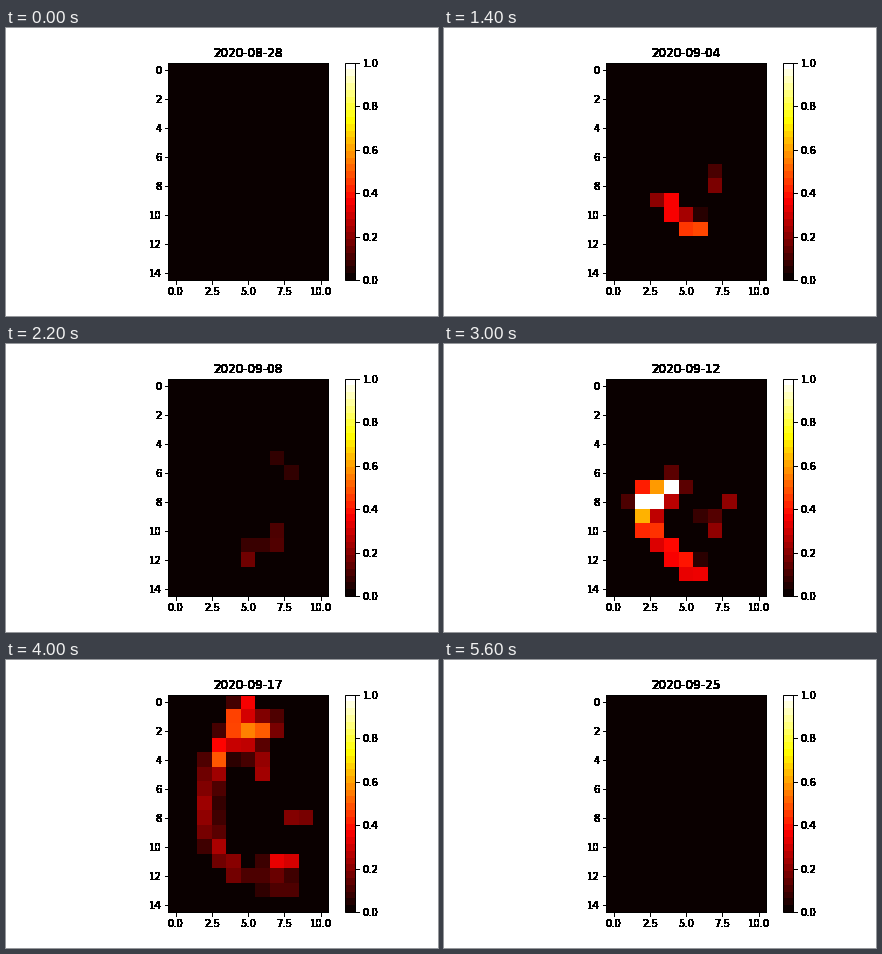
Recreate the animation shown at these times as a matplotlib script. Size 432x288 px, loop 6600 ms.

```python
import numpy as np
import matplotlib.pyplot as plt
from matplotlib.animation import FuncAnimation
from matplotlib.cm import ScalarMappable

ROWS, COLS = 15, 11
DAYS, HOLD = 29, 4          # the last day stays for four extra ticks
STEP = 200
WIDTH = 0.65                # reach of a fire front, in cells
LIFE = 3                    # days from first spark to full heat
DRIFT = np.array([-0.4, 0.4])   # rows and columns per day
FLOOR = 0.045               # weaker heat is not detected

plt.rcParams.update({
    "font.family": "DejaVu Sans", "font.size": 10, "axes.titlesize": 12,
    "figure.subplot.left": 0.125, "figure.subplot.right": 0.9,
    "figure.subplot.bottom": 0.125, "figure.subplot.top": 0.88,
    "axes.linewidth": 1, "xtick.major.width": 1, "ytick.major.width": 1,
})

# hottest day: fronts as (heat, (row, column), ...)
FIRES = {
    7: [(0.45, (9, 3.6), (10, 4.4)), (0.47, (11, 5.2), (11, 6)),
        (0.17, (7.5, 7), (8, 7))],
    11: [(0.06, (5, 7), (6, 8)), (0.06, (11, 5), (11, 6)),
         (0.1, (10, 7), (11, 7)), (0.15, (12, 5))],
    15: [(1.3, (7, 4), (7.7, 3), (7.7, 2)), (0.75, (9, 2.3), (10, 2.5)),
         (0.5, (11, 3.5), (13, 5.6)), (0.2, (8, 8)), (0.2, (9.3, 6.6), (10, 7))],
    18: [(1.7, (1.2, 4), (2.3, 3.2), (3, 4), (2.4, 5.6)),
         (1.5, (3.6, 2.7), (5, 2)), (0.75, (4, 4.6), (5.6, 5.2)),
         (0.75, (6, 1.7), (8, 1.4), (10.3, 1.7), (12, 2.9)),
         (0.6, (9, 7), (9, 8)), (1.1, (12, 6), (12, 7)),
         (0.38, (13, 3), (13.3, 6), (14, 7))],
    24: [(0.06, (6, 0))],
    26: [(0.06, (11, 4))],
}
CELLS = np.stack(np.mgrid[:ROWS, :COLS], axis=-1)


def distance(p, q):
    """Distance of every cell from the segment p-q."""
    d = q - p
    t = np.clip((CELLS - p) @ d / max(d @ d, 1e-9), 0, 1)
    return np.linalg.norm(CELLS - p - t[..., None] * d, axis=-1)


def front(points):
    pts = np.array(points)
    ends = pts[1:] if len(pts) > 1 else pts
    reach = np.min([distance(p, q) for p, q in zip(pts, ends)], axis=0)
    return np.exp(-(reach / WIDTH) ** 2)


def burn(day):
    """Each fire swells, drifts and dies around its hottest day."""
    heat = np.zeros((ROWS, COLS))
    for top, fronts in FIRES.items():
        age = day - top
        power = max(0, 1 - abs(age) / LIFE)
        if power:
            for peak, *points in fronts:
                heat += power * peak * front(points + age * DRIFT)
    return np.where(heat < FLOOR, 0, heat)


def date(day):
    n = 28 + day
    return f"2020-08-{n:02d}" if n <= 31 else f"2020-09-{n - 31:02d}"


def harden(img, dpi):
    """Make every touched pixel solid black."""
    out = np.zeros_like(img)
    out[..., 3] = img[..., 3] > 0.004
    return out, 0, 0


fig, ax = plt.subplots(figsize=(6, 4), dpi=72, facecolor="white")
im = ax.imshow(burn(0), cmap="hot", vmin=0, vmax=1, interpolation="nearest")
bar = fig.colorbar(ScalarMappable(cmap=plt.get_cmap("hot", 32)), ax=ax)
title = ax.set_title(date(0))
for part in (title, ax.xaxis, ax.yaxis, bar.ax.yaxis):
    part.set_agg_filter(harden)


def update(tick):
    day = min(tick, DAYS - 1)
    im.set_data(burn(day))
    title.set_text(date(day))
    return im, title


anim = FuncAnimation(fig, update, frames=DAYS + HOLD, interval=STEP,
                     init_func=lambda: update(0), repeat=True, repeat_delay=0)
plt.show()
```
